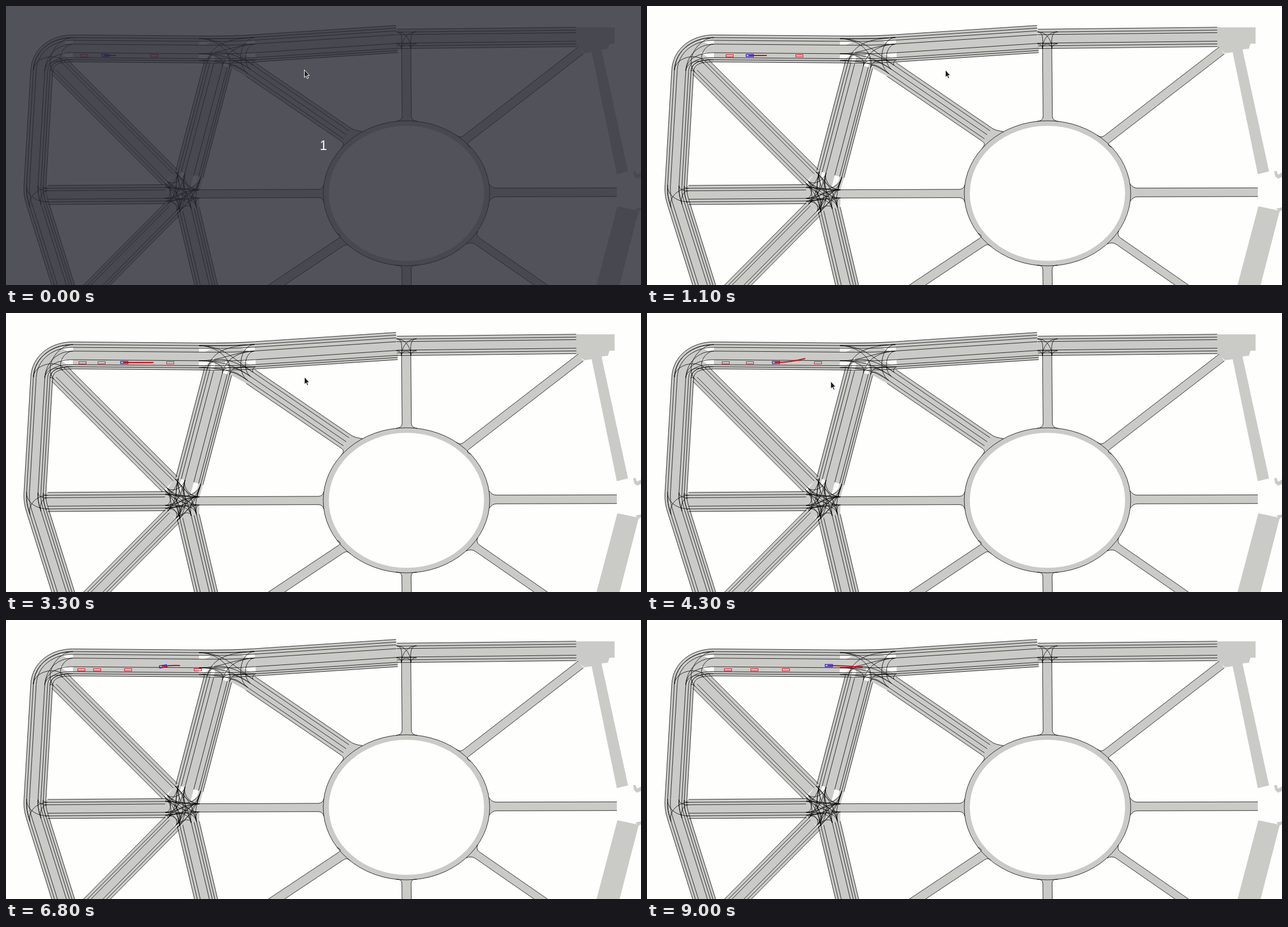
These frames come from a looping animation (1129x496 px, 9100 ms). An HTML page:

```html
<!DOCTYPE html>
<html lang="en">
<head>
<meta charset="utf-8">
<title>Road network simulation</title>
<style>
  html, body { margin: 0; width: 100%; height: 100%; overflow: hidden; background: #fefffc; }
  svg { display: block; width: 100%; height: 100%; }
  #fills { fill: #cacbc7; }
  #gaps { fill: #fefffc; }
  #lines { fill: none; stroke: #000; stroke-width: .8; }
  .car { fill: none; stroke: #e8142e; stroke-width: 1; shape-rendering: crispEdges; }
  #ego { fill: none; stroke: #1c10d8; stroke-width: 1.2; }
  #plan { fill: none; stroke: #dc0018; stroke-width: 2; }
  #count { font: 23px "Liberation Sans", Arial, sans-serif; fill: #fff; text-anchor: middle; }
</style>
</head>
<body>
<svg viewBox="0 0 1129 496" preserveAspectRatio="none">
  <rect width="1129" height="496" fill="#fefffc"/>
  <g id="fills"></g>
  <g id="gaps"></g>
  <g id="lines"></g>
  <rect class="car" y="86.5" width="13" height="4"/>
  <rect class="car" y="86.5" width="13" height="4"/>
  <rect class="car" y="86.5" width="13" height="4"/>
  <rect class="car" y="86.5" width="13" height="4"/>
  <rect id="ego" x="-6.5" y="-2" width="13" height="4"/>
  <path id="plan"/>
  <g id="intro">
    <rect width="1129" height="496" fill="#272933" fill-opacity=".8"/>
    <text id="count" x="564.5" y="256">1</text>
  </g>
  <path id="cursor" d="M.5 .5V14L3.5 11.3L5.6 16L7.7 15L5.6 10.5H9.5Z" fill="#1c1d20" stroke="#fff"/>
</svg>
<script>
const LOOP = 9100, STEP = 100;
const $ = id => document.getElementById(id);
const mix = (a, b, f) => a + (b - a) * f;

// ---- Map ----
const WIDE = [0, .1, .2, .34, .66, .84, .92, 1];
const MAIN = [0, .12, .25, .64, .77, .88, 1];
const SIDE = [0, .15, .28, .72, .86, 1];
const EDGES = [0, 1];
const RING = { x: 712, y: 333, rx: 148, ry: 129 };

function add(layer, d) {
  const p = document.createElementNS("http://www.w3.org/2000/svg", "path");
  p.setAttribute("d", d);
  $(layer).append(p);
}
const fill = d => add("fills", d);
const gap = d => add("gaps", d);
const line = d => add("lines", d);

// A stub is a lane end that points out of its road.
const stub = (x, y, dx, dy) => ({ x, y, dx, dy });
const ahead = (p, k) => `${p.x + p.dx * k} ${p.y + p.dy * k}`;

function curve(p, q) {
  const k = .4 * Math.hypot(q.x - p.x, q.y - p.y);
  return `C${ahead(p, k)} ${ahead(q, k)} ${q.x} ${q.y}`;
}
const link = (p, q) => line(`M${p.x} ${p.y}${curve(p, q)}`);

// Lanes are fractions of the width, counted from the left of the heading.
function road(x1, y1, x2, y2, width, lanes) {
  const len = Math.hypot(x2 - x1, y2 - y1);
  const ux = (x2 - x1) / len, uy = (y2 - y1) / len;
  const ends = (x, y, sign) => lanes.map(f => {
    const off = (f - .5) * width;
    return stub(x - uy * off, y + ux * off, sign * ux, sign * uy);
  });
  const from = ends(x1, y1, -1), to = ends(x2, y2, 1);
  const [a, b, c, d] = [from[0], to[0], to.at(-1), from.at(-1)];
  fill(`M${ahead(a, 0)}L${ahead(b, 0)}L${ahead(c, 0)}L${ahead(d, 0)}Z`);
  from.forEach((p, i) => line(`M${ahead(p, 0)}L${ahead(to[i], 0)}`));
  return { from, to, back: [...from].reverse() };
}

// Carries all lanes of one road over into the next.
function bridge(a, b) {
  const p = a.at(-1), q = b.at(-1);
  fill(`M${ahead(a[0], 0)}${curve(a[0], b[0])}L${ahead(q, 0)}${curve(q, p)}Z`);
  b.forEach((s, i) => link(a[Math.round(i * (a.length - 1) / (b.length - 1))], s));
}

// Fills a crossing and links every two arms, left lanes to right lanes.
function junction(arms) {
  const rim = arms.flatMap(a => [a[0], a.at(-1)]);
  const cx = rim.reduce((s, p) => s + p.x, 0) / rim.length;
  const cy = rim.reduce((s, p) => s + p.y, 0) / rim.length;
  const angle = p => Math.atan2(p.y - cy, p.x - cx);
  rim.sort((p, q) => angle(p) - angle(q));
  fill(`M${rim.map(p => ahead(p, 0)).join("L")}Z`);
  const pick = (arm, f) => arm[Math.round(f * (arm.length - 1))];
  arms.forEach((a, i) => arms.slice(i + 1).forEach(b => {
    for (const f of [.2, .5, .8]) link(pick(a, f), pick(b, 1 - f));
  }));
}

// Unpaved wedges beyond the end of a wide road.
function notch(ends) {
  for (const i of [2, 4]) {
    const a = ends[i], b = ends[i + 1];
    gap(`M${ahead(a, 0)}L${ahead(b, 0)}L${ahead(b, 10)}L${ahead(a, 24)}Z`);
  }
}

// A road into the roundabout, with a flared mouth.
function spoke(x1, y1, x2, y2, width, lanes = EDGES) {
  const r = road(x1, y1, x2, y2, width, lanes);
  const a = Math.atan2((y2 - RING.y) / RING.ry, (x2 - RING.x) / RING.rx);
  const flare = .06 + width / 250;
  const rim = t => `${RING.x + RING.rx * Math.cos(t)} ${RING.y + RING.ry * Math.sin(t)}`;
  const l = r.to[0], m = r.to.at(-1);
  line(`M${ahead(l, 0)}Q${ahead(l, 8)} ${rim(a + flare)}`);
  line(`M${ahead(m, 0)}Q${ahead(m, 8)} ${rim(a - flare)}`);
  fill(`M${ahead(l, 0)}Q${ahead(l, 8)} ${rim(a + flare)}L${rim(a - flare)}Q${ahead(m, 8)} ${ahead(m, 0)}Z`);
  return r;
}

function oval(rx, ry) {
  return `M${RING.x - rx} ${RING.y}a${rx} ${ry} 0 1 1 ${2 * rx} 0a${rx} ${ry} 0 1 1 ${-2 * rx} 0Z`;
}

const top1 = road(119, 75.4, 343, 77.2, 48, WIDE);
const top2 = road(443, 75.2, 695, 58.7, 48.5, WIDE);
const top3 = road(695, 58.5, 1014, 55, 34.5, SIDE);
const left = road(51.5, 319, 63.5, 115, 39, MAIN);
const lower = road(106, 510, 57, 354, 39, MAIN);
const mid = road(74, 336, 283, 334.5, 34, SIDE);
const diag = road(95, 108, 291.5, 304.5, 38, SIDE);
const north = road(326, 299, 377, 104.5, 50, WIDE);
const southWest = road(148, 510, 296, 360.5, 34, SIDE);
const south = road(359, 510, 324, 362, 40, MAIN);

const east = spoke(344, 334, 555, 333.3, 14.7);
const ringNW = spoke(435, 113, 605, 229, 29, [0, .2, .5, .8, 1]);
const ringN = spoke(711.5, 76, 712.5, 196, 16.5);
spoke(1022, 79, 818, 236.5, 15.2);
spoke(1086, 331, 872, 331.5, 15.5);
spoke(971, 510, 838, 418, 13.6);
spoke(712.5, 510, 712, 468, 16.5);
spoke(460, 510, 596, 419.5, 16);

fill(oval(RING.rx, RING.ry));
gap(oval(RING.rx - 10, RING.ry - 9));
line(oval(RING.rx, RING.ry));

bridge(top1.from, left.to);
bridge(lower.to, left.from);
bridge(top1.to, top2.from);
junction([top1.back, left.to, diag.back]);
junction([left.back, lower.to, mid.back]);
junction([top1.to, top2.back, ringNW.back, north.to]);
junction([mid.to, diag.to, north.back, east.back, south.to, southWest.to]);
[top1.from, top1.to, top2.from, north.from, north.to].forEach(notch);

for (const y of [46, 67]) {
  ringN.from.forEach(p => {
    link(stub(694, y, 1, 0), p);
    link(stub(730, y, -1, 0), p);
  });
}

// Paved areas at the right
fill("M1014 38H1082V67H1073L1070 76L1060 77L1058 80L1028 84L1014 72Z");
fill("M1040 76L1058 74L1106 294L1086 299Z");
fill("M1087 356L1125 364L1091 496H1050Z");
fill("M1115 294L1119 293L1122 300L1129 296V304L1122 307L1117 303Z");
fill("M1119 360L1129 358V363L1124 366Z");

// ---- Traffic, in seconds and pixels ----
const boxes = document.querySelectorAll(".car");

function ease(t, a, b) {
  const f = Math.max(0, Math.min(1, (t - a) / (b - a)));
  return f * f * (3 - 2 * f);
}

// Distance covered when speeding up from v to a top speed.
function travel(t, v, acc, max) {
  const up = Math.min(t, (max - v) / acc);
  return v * up + acc * up * up / 2 + max * (t - up);
}

const egoX = t => 177 + travel(t, 3, 4.3, 20);
const egoY = t => 88 - 7 * ease(t, 4.9, 7.6);

function place(box, x, visible) {
  box.setAttribute("x", Math.round(x) + .5);
  box.style.display = visible ? "" : "none";
}

function drawEgo(t) {
  const x = egoX(t), y = egoY(t);
  const slope = (egoY(t + .1) - egoY(t - .1)) / (egoX(t + .1) - egoX(t - .1));
  const late = ease(t, 7.9, 9);
  const dip = 22 * Math.exp(-(((t - 6.8) / .6) ** 2));
  const reach = Math.min(18 + 11 * t, 52) - dip + 8 * late;
  const tipY = 88 - 7 * ease(t, 3.5, 4.2) + 3 * late;
  const bend = reach * .45;
  $("ego").setAttribute("transform", `translate(${x} ${y}) rotate(${Math.atan(slope) * 180 / Math.PI})`);
  $("plan").setAttribute("d", `M${x - 2.5} ${y}Q${x + bend} ${y + bend * slope} ${x + reach} ${tipY}`);
}

// The pointer rests, dips and then leaves through the top left corner.
function drawCursor(t) {
  const f = Math.max(0, (t - 3.8) / .8);
  const x = 530 - 522 * f * f;
  const y = 113 + 200 * f * (1 - f) - 100 * f * f;
  $("cursor").setAttribute("transform", `translate(${x} ${y})`);
  $("cursor").style.display = f <= 1 ? "" : "none";
}

function draw(t) {
  place(boxes[0], 256.5 + travel(t, 6.3, 1.5, 17), t < 7.1);
  for (let i = 1; i < 4; i++) {
    const age = t + 6.35 - 4.15 * i;
    place(boxes[i], 126.5 + travel(Math.max(0, age), 0, 2.4, 13.6), age >= 0);
  }
  drawEgo(t);
  drawCursor(t);
  $("intro").style.display = t < .1 ? "" : "none";
}

const start = performance.now();
function tick() {
  const t = (performance.now() - start) % LOOP;
  draw(Math.floor(t / STEP) * STEP / 1000);
  requestAnimationFrame(tick);
}
tick();
</script>
</body>
</html>
```
